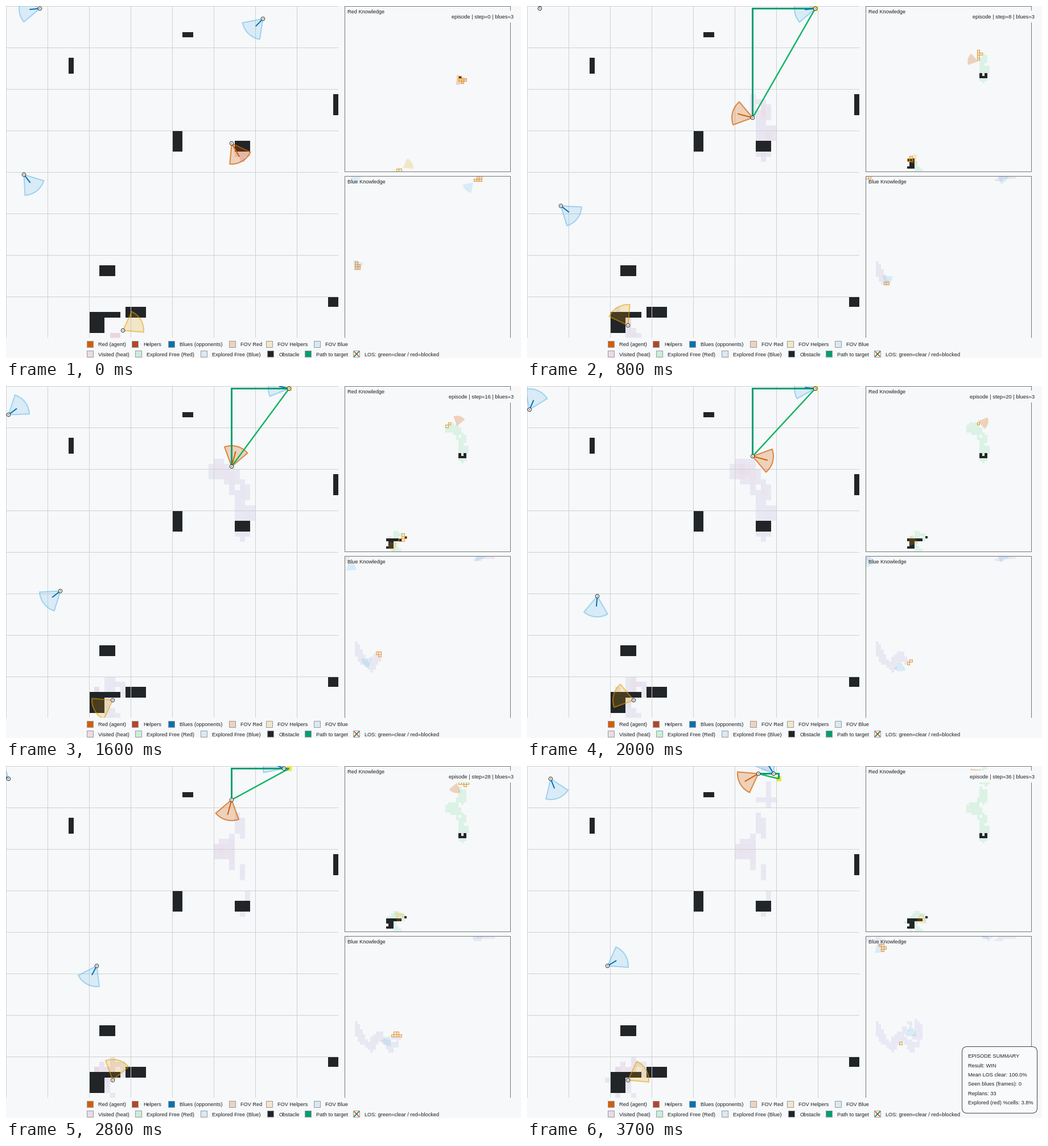
A matplotlib script for the animation above (3800 ms loop, 905 by 619 pixels).

```python
import math

import matplotlib.pyplot as plt
import numpy as np
from matplotlib.animation import FuncAnimation
from matplotlib.collections import PolyCollection
from matplotlib.patches import Circle, FancyBboxPatch, Polygon, Rectangle

W, H, DPI = 905, 619, 100
PX = 72 / DPI
CELLS, VIEW, LAST_STEP = 64, 4, 36
BG, INK, WALL = "#f6f8fa", "#222222", "#222528"
RED, HELPER, BLUE = "#d55e00", "#e69f00", "#0072b2"
SKY, PATH, LOS, NEW, FREE = "#56b4e9", "#009e73", "#16b364", "#f0962a", "#dbf2e5"
COLD, HOT = np.array([232, 234, 245]) / 255, np.array([234, 214, 224]) / 255

plt.rcParams["font.family"] = "Liberation Sans"
fig = plt.figure(figsize=(W / DPI, H / DPI), dpi=DPI, facecolor=BG)


def pixel_axes(x, y, w, h):
    ax = fig.add_axes([x / W, 1 - (y + h) / H, w / W, h / H])
    ax.set_xlim(0, w)
    ax.set_ylim(h, 0)
    ax.axis("off")
    return ax


class View:
    """A square map whose cells are drawn on whole pixels."""

    def __init__(self, x, y, size):
        self.ax, self.scale = pixel_axes(x, y, size, size), size / CELLS

    def center(self, cell):
        return tuple(math.floor((c + 0.5) * self.scale) + 0.5 for c in cell)

    def cells(self, cells, z, **style):
        shift = 0 if "facecolors" in style else 0.5

        def edge(c):
            return math.floor(c * self.scale + 0.5) + shift

        boxes = [[(edge(c + i), edge(r + j)) for i, j in ((0, 0), (1, 0), (1, 1), (0, 1))]
                 for c, r in cells]
        quads = PolyCollection(boxes, antialiased=False, snap=False, zorder=z, **style)
        return self.ax.add_collection(quads, autolim=False)


main = View(0, 0, 584)
red_map = View(595, 0, 291)
blue_map = View(595, 299, 291)
stage = pixel_axes(0, 0, W, H)

# Column, row, width and height in cells
BLOCKS = [(34, 5, 2, 1), (12, 10, 1, 3), (63, 17, 1, 4), (32, 24, 2, 4), (44, 26, 3, 2),
          (18, 50, 3, 2), (62, 56, 2, 2), (16, 59, 3, 4), (19, 59, 3, 1), (23, 58, 4, 2)]
WALLS = {(c + i, r + j) for c, r, w, h in BLOCKS for i in range(w) for j in range(h)}


class Agent:
    """Walks between key poses (step, column, row, heading in degrees)."""

    def __init__(self, poses, color, fill, edge, ray, turn=1):
        self.keys, *self.tracks = zip(*poses)
        self.color, self.fill, self.edge = color, fill, edge
        self.ray, self.turn = ray, turn

    def value(self, track, step):
        return np.interp(step, self.keys, self.tracks[track])

    def cell(self, step):
        return tuple(math.ceil(self.value(k, step) - 0.5) for k in (0, 1))

    def heading(self, step):
        start = self.tracks[2][0]
        return start + self.turn * math.floor((self.value(2, step) - start) / self.turn + 0.5)

    def sensed(self, step):
        """Cells inside a narrow cone; the sensor's axes are swapped against the drawn cone."""
        col, row = self.cell(step)
        aim = 107 - self.heading(step)
        reach = range(-VIEW, VIEW + 1)
        for dx in reach:
            for dy in reach:
                off = (math.degrees(math.atan2(dy, dx)) - aim + 180) % 360 - 180
                cell = (col + dx, row + dy)
                if (0 < math.hypot(dx, dy) <= VIEW and abs(off) < 18.2
                        and all(0 <= c < CELLS for c in cell)):
                    yield cell


def blue_agent(*poses):
    return Agent(poses, SKY, 0.18, 0.5, 2)


red = Agent([(0, 43, 26, 60), (12, 43, 18, 240), (24, 43, 10, 420),
             (32, 43, 3, 465), (36, 44, 1, 510)], RED, 0.25, 0.7, 3, turn=45)
helper = Agent([(0, 22, 62, 330), (4, 20, 62, 240), (12, 19, 61, 240), (16, 20, 60, 150),
                (24, 20, 60, 240), (36, 19, 60, 330)], HELPER, 0.2, 0.55, 0, turn=45)
runner = blue_agent((0, 49, 2, 134), (4, 53, 0, 118), (11, 57, 0, 216), (12, 56, 0, 230),
                    (16, 54, 0, 193), (24, 57, 0, 178), (32, 50, 0, 230),
                    (35, 48, 2, 236), (36, 47, 1, 238))
BLUES = [
    blue_agent((0, 6, 0, 175), (4, 4, 0, 225), (12, 0, 1, 313), (16, 0, 5, 323),
               (24, 0, 4, 263), (32, 1, 0, 170), (36, 4, 2, 68)),
    runner,
    blue_agent((0, 3, 32, 52), (4, 5, 35, 18), (12, 8, 41, 57), (16, 10, 39, 142),
               (24, 16, 41, 47), (32, 19, 36, 188), (36, 15, 38, 329)),
]
REDS = [red, helper]


def explore(team):
    """For each step: how often every cell was sensed, and which cells are new."""
    counts, history = {}, []
    for step in range(LAST_STEP + 1):
        before = set(counts)
        for agent in team:
            for cell in agent.sensed(step):
                counts[cell] = counts.get(cell, 0) + 1
        history.append((dict(counts), set(counts) - before))
    return history


red_history, blue_history = explore(REDS), explore(BLUES)
moving = []


def put(view, patch, z):
    patch.set(zorder=z, snap=False)
    moving.append(view.ax.add_patch(patch))


def line(points, color, width, z):
    moving.extend(main.ax.plot(*zip(*points), color=color, lw=width * PX, zorder=z, snap=False,
                               solid_capstyle="butt", solid_joinstyle="miter"))


def ahead(origin, degrees, distance):
    a = math.radians(degrees)
    return origin[0] + distance * math.cos(a), origin[1] + distance * math.sin(a)


def sector(view, agent, step, outlined=False):
    apex, mid = view.center(agent.cell(step)), agent.heading(step)
    points = [apex] + [ahead(apex, a, VIEW * view.scale)
                       for a in np.linspace(mid - 35, mid + 35, 16)]
    put(view, Polygon(points, fc=agent.color, alpha=agent.fill, lw=0), 5)
    if outlined:
        put(view, Polygon(points, fill=False, ec=agent.color, alpha=agent.edge, lw=2 * PX), 6)


def marker(agent, step):
    spot = main.center(agent.cell(step))
    if agent.ray:
        tip = ahead(spot, agent.heading(step), agent.ray * main.scale)
        line([spot, tip], RED if agent is red else BLUE, 2, 10)
    put(main, Circle(spot, 3.2, fc="white", ec="#333333", lw=PX), 11)
    put(main, Circle(spot, 0.9, fc="#444444", lw=0), 12)


def chase(step):
    goal_cell = runner.cell(step - 1)
    (x, y), (gx, gy) = start, goal = main.center(red.cell(step)), main.center(goal_cell)
    corner = (x, gy) if gy <= y else (gx, y)
    moving.append(main.cells([goal_cell], 7, facecolors="#f0e442"))
    line([start, corner, goal], PATH, 3, 8)
    line([start, goal], LOS, 2.5, 9)


def heat_map(counts, step):
    peak = max(counts.values())
    shown = [cell for cell, n in counts.items() if n >= step / 20]
    colors = [COLD + (HOT - COLD) * counts[cell] / peak for cell in shown]
    moving.append(main.cells(shown, 1, facecolors=colors))


def knowledge(view, team, history, step, color):
    counts, new = history[step]
    moving.append(view.cells(counts, 1, facecolors=color))
    moving.append(view.cells(WALLS & set(counts), 2, facecolors=WALL))
    moving.append(view.cells(new, 8, facecolor="none", edgecolors=NEW, linewidths=PX))
    for agent in team:
        sector(view, agent, step)


def label(x, y, text, **kw):
    return stage.text(x, y, text, fontsize=9.25 * PX, color=INK, va="baseline", zorder=22, **kw)


def frame_box(x, y, w, h, z, **style):
    return stage.add_patch(Rectangle((x, y), w, h, zorder=z, snap=False, **style))


def legend_row(y, *items):
    for x, color, text in items:
        frame_box(x + 0.5, y + 0.5, 11, 11, 21, fc=color, ec="#9a9a9a", lw=PX)
        label(x + 20.3, y + 9.5, text)


# Fixed scenery
for k in range(0, CELLS, 8):
    at = k * main.scale + 0.5
    for xs, ys in (((at, at), (0, 584)), ((0, 584), (at, at))):
        main.ax.plot(xs, ys, color="#cfd0d2", lw=PX, zorder=4, snap=False)
main.cells(WALLS, 3, facecolors=WALL)
for top, title in ((0, "Red Knowledge"), (299, "Blue Knowledge")):
    frame_box(595.5, top + 0.5, 291, 291, 15, fill=False, ec="#777777", lw=PX)
    label(600.3, top + 13.2, title)
frame_box(0, 583.5, W, H, 20, fc=BG, lw=0)
status_box = frame_box(778, 8, 119, 21, 20, fc=BG, lw=0)
status = label(892, 21.5, "", ha="right")

legend_row(589, (142, RED, "Red (agent)"), (221, "#b5452a", "Helpers"),
           (285, BLUE, "Blues (opponents)"), (392, "#eed2bc", "FOV Red"),
           (457, "#f3e6c8", "FOV Helpers"), (541, "#d9e9f5", "FOV Blue"))
legend_row(606, (142, "#e9dbe4", "Visited (heat)"), (227, "#c9efd8", "Explored Free (Red)"),
           (342, "#d9e9f5", "Explored Free (Blue)"), (459, WALL, "Obstacle"),
           (525, PATH, "Path to target"), (610, "#fafafa", "LOS: green=clear / red=blocked"))
stage.plot([612, 620], [616, 608], color="#1a9850", lw=2 * PX, zorder=23)
stage.plot([612, 620], [608, 616], color="#d73027", lw=1.5 * PX, zorder=23)

summary = [stage.add_patch(FancyBboxPatch((764.5, 493.5), 132, 117, snap=False,
                                          boxstyle="round,pad=0,rounding_size=9",
                                          fc="#f8fafc", ec="#444444", lw=PX, zorder=21))]
for n, text in enumerate(["EPISODE SUMMARY", "Result: WIN", "Mean LOS clear: 100.0%",
                          "Seen blues (frames): 0", "Replans: 33",
                          "Explored (red) %cells: 3.8%"]):
    summary.append(label(774.5, 513.3 + 16.4 * n, text))


def draw(frame):
    step = min(frame, LAST_STEP)
    while moving:
        moving.pop().remove()

    counts = red_history[step][0]
    heat_map(counts, step)
    for agent in REDS + BLUES:
        sector(main, agent, step, outlined=True)
        marker(agent, step)
    if step:
        chase(step)

    knowledge(red_map, REDS, red_history, step, FREE)
    trail = COLD + (HOT - COLD) / max(counts.values())
    knowledge(blue_map, BLUES, blue_history, step, [trail])

    status.set_text(f"episode | step={step} | blues=3")
    left = 778 if step < 10 else 772
    status_box.set(x=left, width=897 - left)
    for artist in summary:
        artist.set_visible(frame > LAST_STEP)
    return moving


anim = FuncAnimation(fig, draw, frames=LAST_STEP + 2, interval=100, repeat=True,
                     repeat_delay=0, blit=False, init_func=lambda: [])
plt.show()
```
